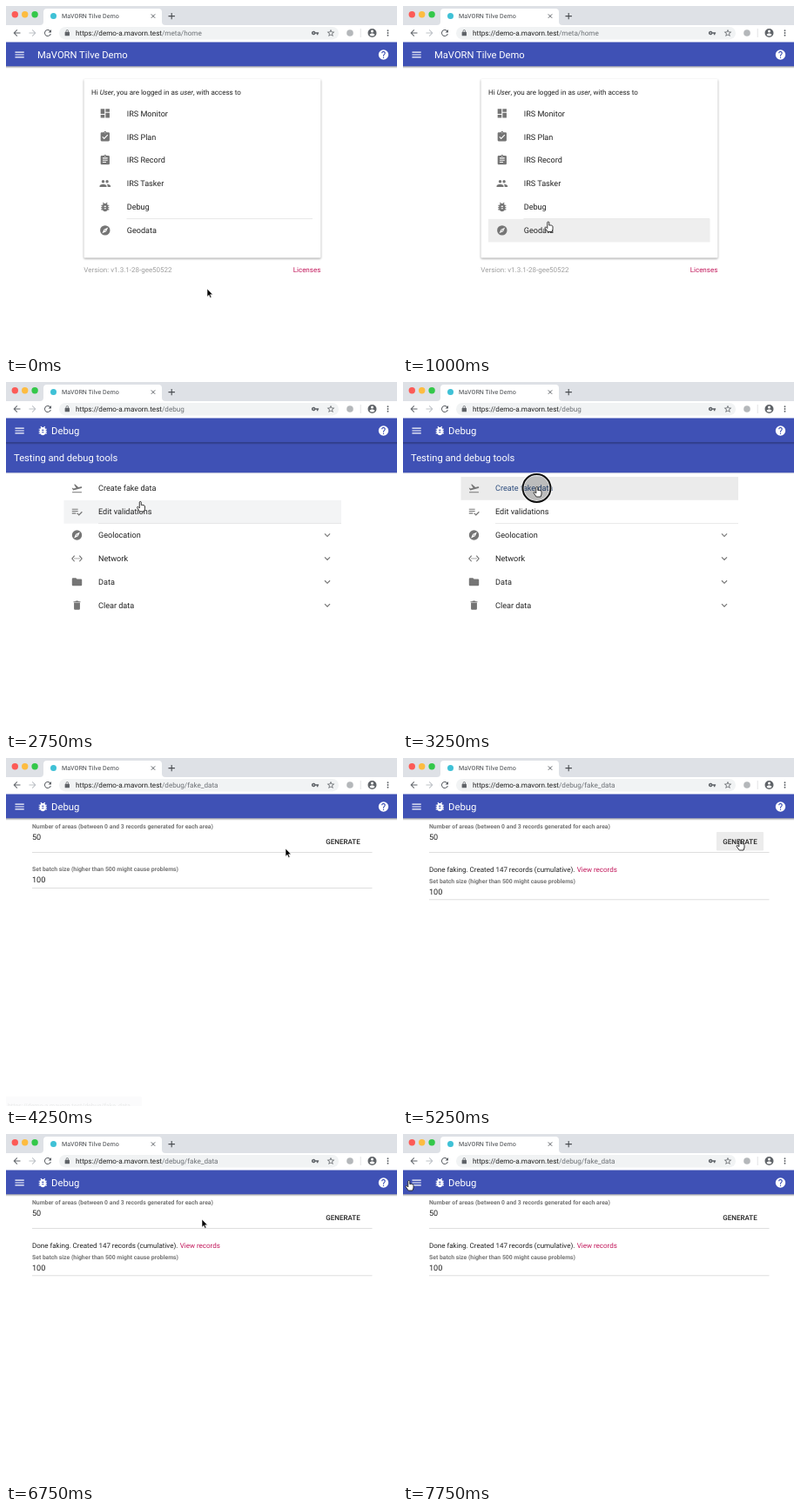
These frames come from a looping animation (449 by 400 pixels, 8 s). An HTML page:

```html
<!DOCTYPE html>
<html lang="en">
<head>
<meta charset="utf-8">
<title>App demo</title>
<style>
  html, body { margin: 0; width: 100%; height: 100%; overflow: hidden; background: #fff; }
  svg { display: block; width: 449px; height: 400px; }
  text { font-family: Roboto, sans-serif; fill: #212121; white-space: pre; text-rendering: geometricPrecision; }
  path { fill-rule: evenodd; }
  .card { filter: drop-shadow(0 1px 1px rgba(0, 0, 0, .38)); }
</style>
</head>
<body>
<svg id="stage" viewBox="0 0 449 400"></svg>
<script>
const STEP = 250, STEPS = 32;
const INDIGO = '#3f51b5', GREY = '#757575', PINK = '#c2185b';
const APP = 'MaVORN Tilve Demo', HOST = 'https://demo-a.mavorn.test';

const clip = 'M19 3h-4.18C14.4 1.84 13.3 1 12 1s-2.4.84-2.82 2H5a2 2 0 0 0-2 2v14a2 2 0 0 0 2 2h14a2 2 0 0 0 2-2V5a2 2 0 0 0-2-2zM12 3a1 1 0 1 1 0 2 1 1 0 0 1 0-2z';
const disc = 'M12 2a10 10 0 1 0 0 20 10 10 0 0 0 0-20z';
const ICONS = {
  menu: 'M3 18h18v-2H3zM3 13h18v-2H3zM3 6v2h18V6z',
  back: 'M20 11H7.83l5.59-5.59L12 4l-8 8 8 8 1.41-1.41L7.83 13H20z',
  forward: 'M12 4l-1.41 1.41L16.17 11H4v2h12.17l-5.58 5.59L12 20l8-8z',
  reload: 'M17.65 6.35A8 8 0 1 0 19.73 14h-2.08A6 6 0 1 1 16.22 7.78L13 11h7V4z',
  lock: 'M18 8h-1V6A5 5 0 0 0 7 6v2H6a2 2 0 0 0-2 2v10a2 2 0 0 0 2 2h12a2 2 0 0 0 2-2V10a2 2 0 0 0-2-2zM9 8V6a3 3 0 0 1 6 0v2z',
  key: 'M12.65 10A6 6 0 1 0 12.65 14H17v4h4v-4h2v-4zM7 14a2 2 0 1 1 0-4 2 2 0 0 1 0 4z',
  star: 'M22 9.24l-7.19-.62L12 2 9.19 8.63 2 9.24l5.46 4.73L5.82 21 12 17.27 18.18 21l-1.63-7.03zM12 15.4l-3.76 2.27 1-4.28-3.32-2.88 4.38-.38L12 6.1l1.71 4.04 4.38.38-3.32 2.88 1 4.28z',
  account: disc + 'M12 5a3 3 0 1 1 0 6 3 3 0 0 1 0-6zM12 19.2a7.2 7.2 0 0 1-6-3.22c.03-1.99 4-3.08 6-3.08s5.97 1.09 6 3.08a7.2 7.2 0 0 1-6 3.22z',
  more: 'M12 4a2 2 0 1 0 0 4 2 2 0 0 0 0-4zM12 10a2 2 0 1 0 0 4 2 2 0 0 0 0-4zM12 16a2 2 0 1 0 0 4 2 2 0 0 0 0-4z',
  help: disc + 'M13 19h-2v-2h2zM15.07 11.25l-.9.92C13.45 12.9 13 13.5 13 15h-2v-.5c0-1.1.45-2.1 1.17-2.83l1.24-1.26A2 2 0 1 0 10 9H8a4 4 0 1 1 7.07 2.25z',
  board: 'M3 13h8V3H3zM3 21h8v-6H3zM13 21h8V11h-8zM13 3v6h8V3z',
  plan: clip + 'M10 17l-4-4 1.41-1.41L10 14.17l6.59-6.59L18 9z',
  record: clip + 'M14 17H7v-2h7zM17 13H7v-2h10zM17 9H7V7h10z',
  people: 'M16 11a3 3 0 1 0 0-6 3 3 0 0 0 0 6zM8 11a3 3 0 1 0 0-6 3 3 0 0 0 0 6zM8 13c-2.33 0-7 1.17-7 3.5V19h14v-2.5C15 14.17 10.33 13 8 13zM16 13l-.97.05C16.2 13.9 17 15 17 16.5V19h6v-2.5c0-2.33-4.67-3.5-7-3.5z',
  bug: 'M20 8h-2.81a6 6 0 0 0-1.82-1.96L17 4.41 15.59 3l-2.17 2.17a6 6 0 0 0-2.83 0L8.41 3 7 4.41l1.62 1.63A6 6 0 0 0 6.81 8H4v2h2.09L6 12H4v2h2l.09 2H4v2h2.81a6 6 0 0 0 10.38 0H20v-2h-2.09L18 14h2v-2h-2l-.09-2H20zM14 16h-4v-2h4zM14 12h-4v-2h4z',
  compass: disc + 'M14.19 14.19L6 18l3.81-8.19L18 6zM12 10.9a1.1 1.1 0 1 0 0 2.2 1.1 1.1 0 0 0 0-2.2z',
  plane: 'M2.5 19h19v2h-19zM22.07 9.64a1.5 1.5 0 0 0-1.84-1.06L14.92 10l-6.9-6.43-1.93.51 4.14 7.17-4.97 1.33-1.97-1.54-1.45.39 2.59 4.49L21 11.49a1.5 1.5 0 0 0 1.07-1.85z',
  checks: 'M14 10H2v2h12zM14 6H2v2h12zM2 16h8v-2H2zM21.5 11.5L23 13l-6.99 7-4.51-4.5L13 14l3.01 3z',
  network: 'M7.77 6.76L6.23 5.48.82 12l5.41 6.52 1.54-1.28L3.42 12zM7 13h2v-2H7zM17 11h-2v2h2zM11 13h2v-2h-2zM17.77 5.48l-1.54 1.28L20.58 12l-4.35 5.24 1.54 1.28L23.18 12z',
  folder: 'M10 4H4a2 2 0 0 0-2 2v12a2 2 0 0 0 2 2h16a2 2 0 0 0 2-2V8a2 2 0 0 0-2-2h-8z',
  bin: 'M6 19a2 2 0 0 0 2 2h8a2 2 0 0 0 2-2V7H6zM19 4h-3.5l-1-1h-5l-1 1H5v2h14z',
  chevron: 'M7.41 8.59L12 13.17l4.59-4.58L18 10l-6 6-6-6z'
};

// Markup helpers
const rect = (x, y, w, h, fill, more = '') =>
  `<rect x="${x}" y="${y}" width="${w}" height="${h}" fill="${fill}" ${more}/>`;
const dot = (x, y, r, fill) => `<circle cx="${x}" cy="${y}" r="${r}" fill="${fill}"/>`;
const text = (x, y, size, str, more = '') =>
  `<text x="${x}" y="${y}" font-size="${size}" ${more}>${str}</text>`;
const tint = color => `style="fill:${color}"`;
const icon = (name, cx, cy, color = GREY, size = 13.7) =>
  `<path d="${ICONS[name]}" fill="${color}" transform="translate(${cx} ${cy}) scale(${size / 24}) translate(-12 -12)"/>`;
const line = (d, color, w) => `<path d="${d}" fill="none" stroke="${color}" stroke-width="${w}"/>`;
const group = (id, body, more = '') => `<g id="${id}" ${more}>${body}</g>`;

const HOME = [['board', 'IRS Monitor'], ['plan', 'IRS Plan'], ['record', 'IRS Record'],
  ['people', 'IRS Tasker'], ['bug', 'Debug'], ['compass', 'Geodata']];
const TOOLS = [['plane', 'Create fake data'], ['checks', 'Edit validations'], ['compass', 'Geolocation'],
  ['network', 'Network'], ['folder', 'Data'], ['bin', 'Clear data']];

const rows = (items, iconX, textX, top, pitch) => items.map(([name, label], i) => {
  const y = top + i * pitch;
  return icon(name, iconX, y) + text(textX, y + 3.2, 9.1, label, `class="label"`);
}).join('');

const lights = ['#fc5b57', '#fdbc40', '#34c84a'].map((c, i) => dot(10.3 + i * 11.4, 9.7, 3.7, c)).join('');
const browser = rect(0, 0, 449, 22, '#dee1e6') + lights +
  '<path d="M39 22q4 0 4-4V7q0-4 4-4h128q4 0 4 4v11q0 4 4 4z" fill="#fff"/>' +
  dot(54.5, 11.6, 3.5, '#3fc1d6') + text(64, 14.2, 7.1, APP, tint('#45494d')) +
  line('M166.8 9.4l4.4 4.4m0-4.4l-4.4 4.4', '#5f6368', 1) +
  line('M186.5 11.6h7.4m-3.7-3.7v7.4', '#4a4d51', 1.1) +
  rect(0, 22, 449, 20, '#fff') + rect(61, 24, 321, 14.4, '#f1f3f4', 'rx="7.2"') +
  icon('back', 12.5, 31, '#5f6368', 12) + icon('forward', 30.5, 31, '#bdc1c6', 12) +
  icon('reload', 48, 31, '#5f6368', 12) + icon('lock', 70.3, 31, '#5f6368', 8) +
  text(80, 34, 8.15, `${HOST}<tspan id="path" fill="#6b6f74"></tspan>`) +
  icon('key', 355, 31, '#5f6368', 9) + icon('star', 373, 31, '#5f6368', 10.5) +
  dot(395, 31, 3.8, '#b4b7ba') + rect(406.8, 26, .7, 10, '#d5d7da') +
  icon('account', 420.5, 31, '#5f6368', 12) + icon('more', 438.5, 31, '#5f6368', 11);

const appBar = rect(0, 41.5, 449, 27.8, INDIGO) + rect(0, 69.3, 449, 2.6, 'url(#fade)') +
  icon('menu', 15.6, 56, '#fff') + icon('help', 433.5, 56, '#fff') +
  group('homeTitle', text(36, 59.8, 11.2, APP, tint('#fff'))) +
  group('debugTitle', icon('bug', 42.3, 56, '#fff') + text(52, 59.8, 11.3, 'Debug', tint('#fff')));

const home = rect(89.5, 84, 272, 205.5, '#fff', 'rx="1" class="card"') + rect(138.5, 244, 213.5, .6, '#d9d9d9') +
  '<rect id="homeHover" x="98" width="254.5" height="26.6" fill="#eee"/>' +
  text(98, 102.3, 8, 'Hi <tspan font-style="italic">User</tspan>, you are logged in as <tspan font-style="italic">user</tspan>, with access to') +
  rows(HOME, 113.8, 138.7, 123.4, 26.9) +
  text(89.3, 305.5, 8, 'Version: v1.3.1-28-gee50522', tint('#9e9e9e')) + text(329.7, 305.5, 8, 'Licenses', tint(PINK));

const tools = rect(0, 69, 449, 35.3, INDIGO) + rect(0, 104.3, 449, 1, '#000', 'opacity=".1"') +
  text(9, 90.8, 11.2, 'Testing and debug tools', tint('#fff')) +
  '<rect id="toolHover" x="66.5" width="318.5" height="26.8"/>' + rect(106, 162, 279, .6, '#ddd') +
  rows(TOOLS, 81.5, 106, 122.2, 26.9) +
  [2, 3, 4, 5].map(i => icon('chevron', 369, 122.2 + i * 26.9)).join('') +
  group('flash', rect(169.8, 216.8, 111.6, 13.6, '#e93a64'));

const small = `font-weight="700" ${tint('#757575')}`;
const rule = y => rect(30, y, 390.5, .7, '#d0d0d0');
const fake = rect(360, 85, 54, 21.5, '#ececec', 'rx="1" id="press"') +
  text(30, 81, 6.83, 'Number of areas (between 0 and 3 records generated for each area)', small) +
  text(30, 94, 9.1, '50') + rule(108.2) +
  text(367.3, 98.6, 8, 'GENERATE', 'font-weight="500"') +
  group('done', text(30, 131, 8, 'Done faking. Created 147 records (cumulative).') +
    text(199.7, 131, 8, 'View records', tint(PINK))) +
  group('batch', text(30, 130.3, 6.83, 'Set batch size (higher than 500 might cause problems)', small) +
    text(30, 143.3, 9.1, '100') + rule(149)) +
  group('status', rect(-2, 389, 158, 13, '#e8eaed', 'rx="2"') +
    text(2, 401.5, 7, HOST + '/debug/fake_data', tint('#5f6368')));

const toast = rect(145, 55.2, 161, 27, '#323232', 'rx="1" class="card"') +
  text(158, 71.6, 8, 'Created records', tint('#fff')) +
  text(278, 71.6, 8, 'OK', `font-weight="500" ${tint('#e0315f')}`);

const pointer = group('ring',
    '<circle r="16.2" fill="rgba(0,0,0,.2)" stroke="#fff" stroke-width="4" stroke-opacity=".7"/>' +
    '<circle r="16" fill="none" stroke="#111" stroke-width="2"/>') +
  group('cursor',
    '<path id="arrow" d="M0 0V9.2L2.1 7.3 3.5 10.4 5 9.7 3.6 6.7H6.4Z" fill="#000" stroke="#fff" stroke-width=".6"/>' +
    '<path id="hand" d="M-1.2.2C-1.2-.7.8-.7.8.2V3.6C3 3.2 5 3.8 5 5.2V8L4 11H-.8L-3.8 6.8C-4.4 5.6-3 5-2.2 6L-1.2 7Z" fill="#fff" stroke="#222" stroke-width=".9"/>');

document.getElementById('stage').innerHTML =
  `<defs><linearGradient id="fade" x2="0" y2="1"><stop stop-opacity=".35"/><stop offset="1" stop-opacity="0"/></linearGradient></defs>` +
  rect(0, 0, 449, 400, '#fff') + group('home', home) + group('tools', tools) + group('fake', fake) +
  browser + appBar + group('toast', toast) + pointer;

// Pointer stops: step, x, y, hand?
const STOPS = [[0, 231, 325, 0], [3, 182, 268, 1], [4, 167, 248.5, 1], [5, 159, 236, 1], [6, 157, 229, 1],
  [8, 157, 229, 1], [12, 154, 121, 1], [14, 154, 121, 1], [15, 165, 120, 0], [17, 321, 104, 0],
  [19, 387, 95, 1], [22, 387, 95, 1], [24, 298.5, 70.5, 1], [25, 284, 67, 1], [26, 270, 78, 0],
  [28, 180, 118, 0], [30, 62, 64, 0], [31, 7, 54, 1]];
const CLICKS = [6, 13, 20, 25];

const $ = id => document.getElementById(id);
const show = (id, on) => $(id).setAttribute('display', on ? 'inline' : 'none');
const place = (id, x, y) => $(id).setAttribute('transform', `translate(${x} ${y})`);
const toolLabel = document.querySelector('#tools .label');

function pointerAt(step) {
  let i = STOPS.length - 1;
  while (STOPS[i][0] > step) i--;
  const [s, x, y, hand] = STOPS[i], next = STOPS[i + 1];
  if (!next) return { x, y, hand };
  const k = (step - s) / (next[0] - s), e = k * k * (3 - 2 * k);
  return { x: x + (next[1] - x) * e, y: y + (next[2] - y) * e, hand };
}

function hover(id, top, pitch, y, on) {
  const row = Math.floor((y - top) / pitch);
  show(id, on && row >= 0 && row < 6);
  $(id).setAttribute('y', top + row * pitch);
}

function draw(step) {
  const { x, y, hand } = pointerAt(step);
  const page = step < 7 ? 'home' : step < 15 ? 'tools' : 'fake';
  const click = CLICKS.includes(step), done = step >= 21;
  for (const id of ['home', 'tools', 'fake']) show(id, id === page);
  show('homeTitle', page === 'home');
  show('debugTitle', page !== 'home');
  $('path').textContent = { home: '/meta/home', tools: '/debug', fake: '/debug/fake_data' }[page];

  hover('homeHover', 110.3, 26.9, y, hand);
  hover('toolHover', 109, 26.9, y, hand);
  const pressed = step === 13 || step === 14;
  $('toolHover').setAttribute('fill', pressed ? '#ebebeb' : '#f3f4f5');
  toolLabel.style.fill = pressed ? '#2a4a7c' : '';
  show('flash', step === 7);

  show('press', step >= 19 && step <= 22);
  show('done', done);
  place('batch', 0, done ? 13.5 : 0);
  show('status', step <= 17);
  $('status').setAttribute('opacity', step < 17 ? .6 : .14);
  show('toast', step >= 22 && step <= 25);

  show('ring', click);
  place('ring', x - .5, y + 1);
  place('cursor', x, y);
  show('hand', hand);
  show('arrow', !hand);
}

let last = -1;
function tick() {
  const step = Math.floor(performance.now() / STEP) % STEPS;
  if (step !== last) draw(last = step);
  requestAnimationFrame(tick);
}
tick();
</script>
</body>
</html>
```
